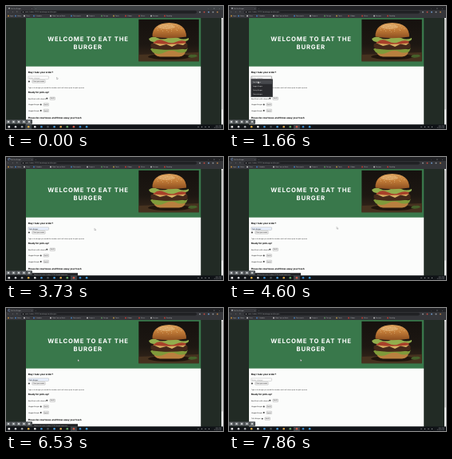
These frames come from a looping animation (272 by 154 pixels, 8 s). An HTML page:

```html
<!DOCTYPE html>
<html lang="en">
<head>
<meta charset="utf-8">
<title>Eat the Burger</title>
<style>
  html, body { margin: 0; width: 100%; height: 100%; overflow: hidden; background: #202124; }
  svg { display: block; width: 100vw; height: 100vh; }
  text { font-family: Inter, Arial, sans-serif; text-rendering: geometricPrecision; white-space: pre; }
  .title { font-size: 7.7px; font-weight: 700; letter-spacing: .82px; fill: #fff; text-anchor: middle; }
  .head { font-size: 2.9px; font-weight: 700; fill: #000; }
  .row { font-size: 2.05px; fill: #222; }
  .note { font-size: 1.83px; fill: #222; }
  .ui { font-size: 1.9px; fill: #b4b7ba; }
  .item { font-size: 1.83px; fill: #eee; }
</style>
</head>
<body>
<svg viewBox="0 0 272 154" preserveAspectRatio="none">
  <defs>
    <linearGradient id="bun" x2="0" y2="1">
      <stop offset="0" stop-color="#d9a05c"/><stop offset=".45" stop-color="#c27c38"/><stop offset="1" stop-color="#8c4e20"/>
    </linearGradient>
    <linearGradient id="room" x2="0" y2="1">
      <stop offset="0" stop-color="#15110e"/><stop offset=".6" stop-color="#1d1712"/><stop offset="1" stop-color="#3a291c"/>
    </linearGradient>
    <clipPath id="photoClip"><rect x="166.3" y="16.8" width="75.5" height="52.4"/></clipPath>
  </defs>

  <rect width="272" height="154" fill="#222b25"/>
  <rect x="25" y="15" width="219.2" height="61" fill="#39784b"/>
  <rect x="25" y="75.7" width="219.2" height="73" fill="#fbfcfb"/>
  <text class="title" x="103" y="43.9">WELCOME TO EAT THE</text>
  <text class="title" x="102.7" y="53.9">BURGER</text>

  <g clip-path="url(#photoClip)">
    <rect x="166" y="16" width="77" height="54" fill="url(#room)"/>
    <path d="M166 61L242 58V70H166Z" fill="#46321f"/>
    <ellipse cx="205" cy="63.5" rx="27" ry="3.5" fill="#20150d"/>
    <path d="M185 55H225Q225 63 217 63.5H193Q185 63 185 55Z" fill="#b9803f"/>
    <path d="M181 54Q186 50 193 53T207 53T220 53T228 52L226 57Q219 60 213 57T199 58T184 58Z" fill="#7f9a3a"/>
    <path d="M182 47Q205 44 227 47Q229 52 225 53.5Q205 56 184 53.5Q180 51 182 47Z" fill="#45291a"/>
    <path d="M184 46H226L222 49L215 47.5L208 51L201 48L193 50Z" fill="#d9b164"/>
    <path d="M184 43Q204 39 226 43L225 46.5Q204 49 185 46.5Z" fill="#a8412a"/>
    <path d="M179 41Q184 37 190 40T203 40T216 40T229 40Q230 43 225 44Q219 42 213 45T199 44T186 45Q180 45 179 41Z" fill="#93ad4d"/>
    <path d="M183.5 38.5Q183 21.5 204.5 21Q226 21.5 226 38.5Q205 42 183.5 38.5Z" fill="url(#bun)"/>
    <ellipse cx="201" cy="26" rx="11" ry="3" fill="#eac48a" opacity=".45"/>
    <g id="seeds" fill="#f0d9a8"></g>
    <path d="M228 64Q230 60 234 61Q239 60 240 63Q234 66 228 64Z" fill="#46602a"/>
  </g>

  <text class="head" x="27.7" y="84.3">May I take your order?</text>
  <rect id="field" x="28" y="88" width="25.5" height="3.4" stroke-width=".35"/>
  <text id="value" class="row" x="28.8" y="90.5"></text>
  <circle cx="28.9" cy="94.4" r="1" fill="#333"/>
  <rect id="order" x="32.8" y="92.7" width="16.4" height="3.5" rx=".5" stroke="#858585" stroke-width=".3"/>
  <text class="note" x="41" y="95.1" text-anchor="middle">Place your order</text>
  <text class="note" x="28" y="102.7">Type in the burger you would like to order and it will show up on the pick-up area</text>
  <text class="head" x="27.7" y="109.2">Ready for pick-up!</text>
  <g id="list"></g>
  <text id="trash" class="head" x="27.7">Please be courteous and throw away your trash</text>
  <g id="menu"></g>

  <rect x="270" y="15" width="2" height="134" fill="#f1f1f1"/>
  <rect id="thumb" x="270.2" y="16.5" width="1.6" fill="#c1c1c1"/>

  <g id="chrome"></g>
  <path id="spinner" d="M0-1.25A1.25 1.25 0 1 1-1.25 0" fill="none" stroke="#8ab4f8" stroke-width=".5"/>
  <g id="status"></g>
  <g id="bar"></g>
  <path id="cursor" d="M0 0V2.7L.7 2.1L1.1 3L1.5 2.8L1.1 1.9H1.9Z" fill="#fff" stroke="#555" stroke-width=".25"/>
</svg>

<script>
const LOOP = 8000;
const OPEN = 630, PICK = 1860, PRESS = 2730, RELEASE = 3000;
const LOAD = 3200, DONE = 7600;

// time, x, y
const PATH = [
  [60, 63.5, 89], [330, 45, 87], [1060, 45, 87], [1260, 36, 94.3],
  [1860, 36, 94.3], [2060, 43, 93.5], [2730, 43, 93.5], [2800, 43.5, 94],
  [3200, 43.5, 94], [4000, 135, 87.5], [4930, 135, 87.5],
  [5730, 113, 73], [5800, 113, 73], [6600, 89.5, 64]
];

const $ = id => document.getElementById(id);

function add(parent, tag, attrs, content = "") {
  const el = document.createElementNS("http://www.w3.org/2000/svg", tag);
  for (const key in attrs) el.setAttribute(key, attrs[key]);
  el.textContent = content;
  parent.append(el);
  return el;
}
const rect = (p, x, y, width, height, fill, more) =>
  add(p, "rect", { x, y, width, height, fill, ...more });
const dot = (p, cx, cy, r, fill) => add(p, "circle", { cx, cy, r, fill });
const label = (p, x, y, content, cls, more) =>
  add(p, "text", { x, y, class: cls, ...more }, content);

function buildSeeds() {
  for (let i = 0; i < 24; i++) {
    const a = i * 2.4, r = Math.sqrt(i / 24);
    add($("seeds"), "ellipse", {
      cx: 204 + 17 * r * Math.cos(a), cy: 28 + 5 * r * Math.sin(a), rx: .5, ry: .3
    });
  }
}

function buildList() {
  const burgers = [
    ["Beefstack with cheese", 51.3, 55], ["Veggie Burger", 43.7, 47],
    ["Veggie Burger", 43.7, 47], ["Tofu Burger", 41.7, 45]
  ];
  return burgers.map(([name, mark, button], i) => {
    const g = add($("list"), "g", { transform: `translate(0 ${115.8 + i * 7.6})` });
    label(g, 28, .7, name, "row");
    dot(g, mark, 0, .95, "#333");
    rect(g, button, -1.7, 6.5, 3.4, "#eee", { rx: .5, stroke: "#858585", "stroke-width": .3 });
    label(g, button + 3.25, .65, "Eat It!", "note", { "text-anchor": "middle" });
    return g;
  });
}

function buildMenu() {
  const menu = $("menu");
  rect(menu, 27.6, 91.6, 27.2, 22.3, "#292a2d", { stroke: "#4a4b4e", "stroke-width": .3 });
  const hover = rect(menu, 27.8, 92.7, 26.8, 5, "#47494d");
  ["Tofu Burger", "Veggie Burger", "Turkey Burger", "Cheeseburger"].forEach((name, i) =>
    label(menu, 29.7, 95.9 + i * 5.1, name, "item"));
  return hover;
}

function buildChrome() {
  const g = $("chrome");
  const strip = rect(g, 0, 0, 272, 5.2);
  rect(g, 1.5, .7, 33, 4.6, "#35363a", { rx: 1 });
  label(g, 6.2, 3.5, "Eat the Burger", "ui");
  label(g, 32, 3.5, "×", "ui");
  label(g, 36.5, 3.7, "+", "ui");
  ["–", "□", "×"].forEach((s, i) => label(g, 253 + i * 7, 3.5, s, "ui"));
  rect(g, 0, 5, 272, 10, "#35363a");
  ["←", "→", "↻"].forEach((s, i) => label(g, 2 + i * 5.5, 8.3, s, "ui"));
  rect(g, 19, 5.7, 220, 3.8, "#202124", { rx: 1.9 });
  label(g, 24, 8.3, "calm-harbor-27356.herokuapp.com/burgers", "ui");
  dot(g, 21.5, 7.6, .6, "#aaa");
  ["#9aa0a6", "#d84c42", "#78a8e0", "#9aa0a6", "#ca8b48"].forEach((c, i) =>
    dot(g, 243 + i * 5.5, 7.6, .9, c));

  const marks = [
    [2, "Apps", "#e0a03b"], [11, "Notes", "#4c8ed9"], [22, "Class", "#eee"],
    [34, "Calendar", "#4c8ed9"], [55, "Web Course Work", "#e3e3e3"],
    [81, "Documents", "#4590d5"], [101, "Projects", "#ddd"],
    [119, "Design", "#62a468"], [134, "Tools", "#cfaa4b"],
    [149, "Videos", "#dd3e35"], [166, "Music", "#dd3e35"],
    [181, "Recipes", "#ddd"], [198, "Reading", "#dd3e35"]
  ];
  for (const [x, name, color] of marks) {
    dot(g, x + 1, 12.4, .85, color);
    label(g, x + 3, 13.1, name, "ui");
  }
  return strip;
}

function buildStatus() {
  rect($("status"), 0, 145.2, 90, 3.4, "#202124");
  label($("status"), 35, 147.6, "Waiting for calm-harbor-27356.herokuapp.com...", "ui");
}

const iconX = i => 12 + i * 8.1;

function buildBar() {
  const g = $("bar");
  rect(g, 0, 148.4, 272, 5.6, "#101317");
  const active = rect(g, 0, 148.4, 8, 5.6, "#3b4146");
  rect(g, 2.5, 150, 2.6, 2.6, "#ddd");
  const apps = ["#cfd2d5", "#a7aaad", "#e3b24a", "#e7e7e7", "#3f8fce", "#485057",
    "#4b9cd8", "#dda64b", "#68a867", "#d65b47", "#3588cd", "#3f9ad8"];
  apps.forEach((c, i) => dot(g, iconX(i), 151.3, 1.3, c));
  for (let i = 0; i < 4; i++) dot(g, 241 + i * 4.5, 151.3, .6, "#aeb2b5");
  label(g, 270, 150.8, "9:40 PM", "ui", { "text-anchor": "end" });
  label(g, 270, 153.2, "6/12/2020", "ui", { "text-anchor": "end" });

  rect(g, 0, 142.3, 33, 5.4, "#45494c", { rx: .6 });
  [3, 9.5, 16, 22.5, 29].forEach(x => {
    rect(g, x - 2.4, 142.9, 4.8, 4.2, "#6d7275", { rx: .5 });
    dot(g, x, 145, 1, "#e6e8e9");
  });
  return active;
}

function cursorAt(t) {
  const i = PATH.findIndex(p => p[0] > t);
  if (i < 0) return PATH[PATH.length - 1].slice(1);
  if (i === 0) return PATH[0].slice(1);
  const [t0, x0, y0] = PATH[i - 1], [t1, x1, y1] = PATH[i];
  const u = (t - t0) / (t1 - t0), e = u * u * (3 - 2 * u);
  return [x0 + (x1 - x0) * e, y0 + (y1 - y0) * e];
}

const show = (el, on) => el.setAttribute("visibility", on ? "visible" : "hidden");

buildSeeds();
const rows = buildList();
const hover = buildMenu();
const strip = buildChrome();
const favicon = dot($("chrome"), 4, 2.9, .9, "#b9bcc0");
buildStatus();
const active = buildBar();

function render(t) {
  const filled = t >= PICK && t < DONE;
  const focused = t >= OPEN && t < PRESS;
  const done = t >= DONE;
  const loading = t >= LOAD && !done;
  const open = t >= OPEN && t < PICK;

  // The first click brings the window to the front.
  strip.setAttribute("fill", t < OPEN ? "#3c4043" : "#202124");
  active.setAttribute("x", iconX(t < OPEN ? 2 : 9) - 4);

  $("field").setAttribute("fill", filled ? "#e8f0fe" : "#fff");
  $("field").setAttribute("stroke", focused ? "#222" : "#999");
  $("value").textContent = filled ? "Tofu Burger" : "Enter a burger";
  $("value").style.fill = filled ? "#222" : "#888";
  $("order").setAttribute("fill", t >= PRESS && t < RELEASE ? "#d5d5d5" : "#eee");
  show($("menu"), open);
  show(hover, open && t >= 1200);
  show(rows[3], done);
  $("trash").setAttribute("y", done ? 151 : 140.5);
  $("thumb").setAttribute("height", done ? 108 : 113);

  show(favicon, !loading);
  show($("spinner"), loading);
  show($("status"), loading);
  $("spinner").setAttribute("transform", `translate(4 2.9) rotate(${(t - LOAD) * .36})`);
  $("cursor").setAttribute("transform", `translate(${cursorAt(t).join(" ")})`);
}

const start = performance.now();
function tick() {
  render((performance.now() - start) % LOOP);
  requestAnimationFrame(tick);
}
tick();
</script>
</body>
</html>
```
